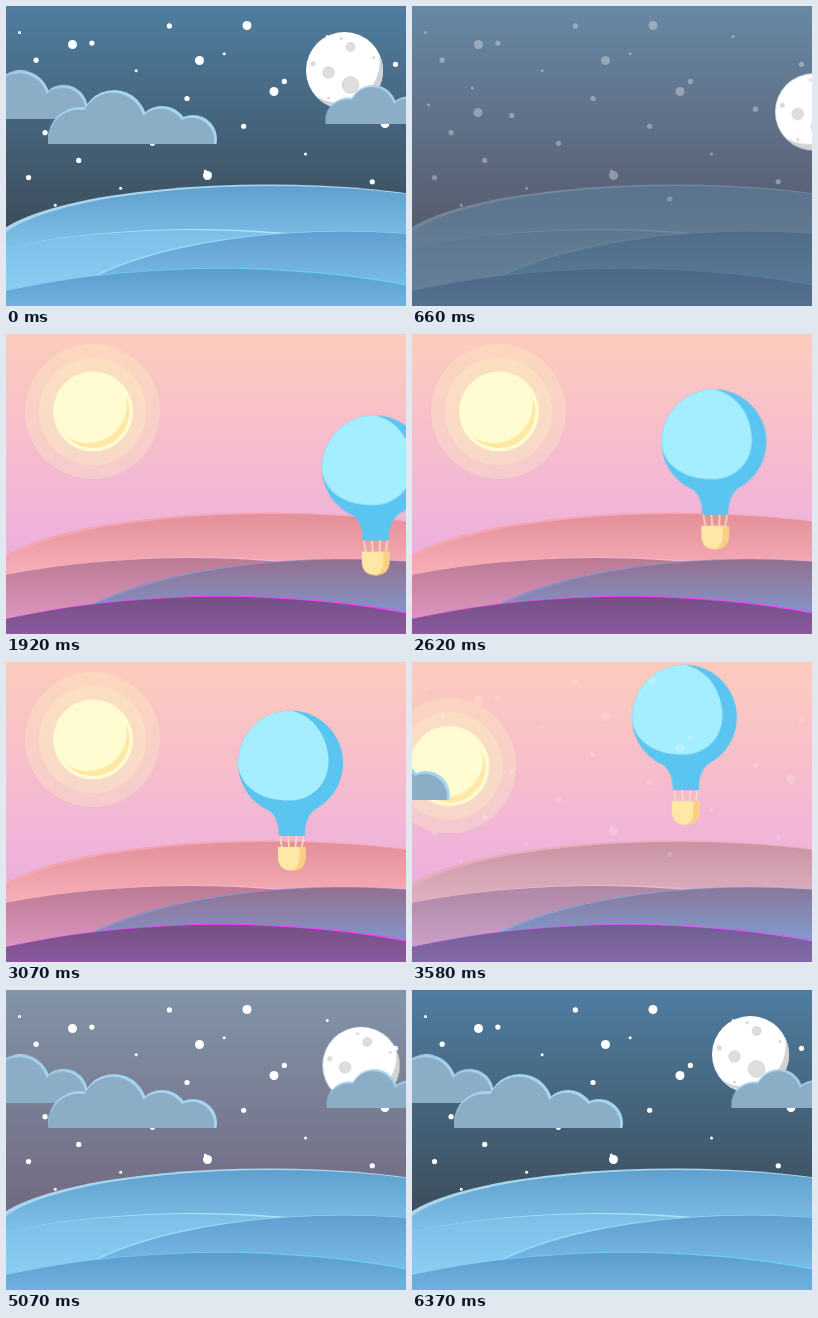
These frames come from a looping animation (400 px wide and 300 px high, 6.78 s). An HTML page:

```html
<!DOCTYPE html>
<html lang="en">
<head>
<meta charset="utf-8">
<title>Night and day</title>
<style>
  html, body { margin: 0; width: 100%; height: 100%; overflow: hidden; background: #4f7da0; }
  svg { display: block; width: 100vw; height: 100vh; }
  .move { animation: 6780ms ease-in-out infinite; }

  #dusk { animation-name: dusk; }
  #snow, #nightHills { animation-name: frost; }
  #sun { animation-name: sun; }
  #moon { animation-name: moon; }
  #balloon { animation-name: balloon; }
  #cloudA { animation-name: cloudA; }
  #cloudB { animation-name: cloudB; }
  #cloudC { animation-name: cloudC; }

  @keyframes dusk {
    0%, 2.655% { opacity: 1; }
    29.2%, 52.2% { opacity: 0; }
    88.5%, 100% { opacity: 1; }
  }
  @keyframes frost {
    0%, 2.655% { opacity: 1; }
    14.45%, 48.525% { opacity: 0; }
    62.54%, 100% { opacity: 1; }
  }
  @keyframes sun {
    0%, 11.8% { transform: translate(-180px, 96px); }
    26.55%, 48.525% { transform: translate(0, 0); }
    60.32%, 100% { transform: translate(-180px, 96px); }
  }
  @keyframes moon {
    0%, 2.655% { transform: translate(0, 0); }
    15.93%, 63.42% { transform: translate(113px, 74px); }
    78.91%, 100% { transform: translate(0, 0); }
  }
  @keyframes balloon {
    0% { transform: translate(180px, 70px); }
    14.75% { transform: translate(180px, 70px); animation-timing-function: cubic-bezier(.4, .42, .72, 1); }
    45.28%, 48.525% { transform: translate(0, 0); }
    63.27%, 100% { transform: translate(-69px, -260px); }
  }
  @keyframes cloudA {
    0%, 2.655% { transform: translate(0, 0); }
    9.44%, 54.13% { transform: translate(-125px, 0); }
    69.6%, 100% { transform: translate(0, 0); }
  }
  @keyframes cloudB {
    0%, 2.655% { transform: translate(0, 0); }
    9.44%, 47.94% { transform: translate(-215px, 0); }
    63.9%, 100% { transform: translate(0, 0); }
  }
  @keyframes cloudC {
    0%, 2.655% { transform: translate(0, 0); }
    9.44%, 60.47% { transform: translate(100px, 0); }
    75.96%, 100% { transform: translate(0, 0); }
  }
</style>
</head>
<body>
<svg viewBox="0 0 400 300" preserveAspectRatio="none">
  <defs>
    <linearGradient id="daySky" gradientUnits="userSpaceOnUse" x1="0" y1="0" x2="0" y2="215">
      <stop stop-color="#fdccbc"/><stop offset=".45" stop-color="#f7bfcb"/><stop offset="1" stop-color="#edb0de"/>
    </linearGradient>
    <linearGradient id="nightSky" gradientUnits="userSpaceOnUse" x1="0" y1="0" x2="0" y2="215">
      <stop stop-color="#4f7da0"/><stop offset="1" stop-color="#3d4f5e"/>
    </linearGradient>
    <clipPath id="cloudFloor"><rect x="-10" y="-60" width="200" height="60"/></clipPath>
    <g id="cloud" clip-path="url(#cloudFloor)"></g>
  </defs>

  <rect width="400" height="300" fill="url(#daySky)"/>
  <g id="dayHills"></g>
  <rect id="dusk" class="move" width="400" height="300" fill="url(#nightSky)"/>

  <g id="sun" class="move">
    <g fill="#fbf3c0">
      <circle cx="86.5" cy="77.5" r="67.5" opacity=".3"/>
      <circle cx="86.5" cy="77.5" r="53.7" opacity=".3"/>
    </g>
    <circle cx="87" cy="77.5" r="40" fill="#fffcd2"/>
    <path d="M119.5 61A36.5 36.5 0 0 1 59.9 102A38.5 38.5 0 0 0 119.5 61" fill="#ffe8a6"/>
  </g>

  <g id="balloon" class="move">
    <g transform="translate(284.5 101)">
      <path d="M-10.5 72L-8.5 85M-2.5 72L-1.5 85M6 72L5 85M13.3 72L11.3 85" stroke="#ffe0b0" stroke-width="1.6"/>
      <g fill="#5bc5f2">
        <circle r="52.5"/>
        <path d="M-40 34C-20 47 -11.5 52 -11.5 73H14.5C14.5 52 22 47 40 34Z"/>
      </g>
      <path d="M-52 5C-47 29 -23 38 0 37.5C24 37 39 18 38 -4C37 -28 22 -48 0 -52.5A52.5 52.5 0 0 0 -52 5" fill="#a4eeff"/>
      <path d="M-12.5 84H15V95Q14 107.5 1.2 107.5Q-11.5 107.5 -12.5 95Z" fill="#ffe8a5"/>
      <path d="M9 84H15V95Q14 107.5 1.2 107.5Q8.5 105 9 95Z" fill="#fbd083"/>
    </g>
  </g>

  <g id="snow" class="move" fill="#fff"></g>
  <g id="nightHills" class="move"></g>

  <g id="moon" class="move">
    <g transform="translate(338.5 64.5)">
      <circle r="38.5" fill="#fff"/>
      <path d="M34.3 -17.5A38.5 38.5 0 0 1 -29.7 24.5A41 41 0 0 0 34.3 -17.5" fill="#d2d2d2"/>
      <g id="craters" fill="#dedede" stroke="#c9c9c9" stroke-width=".8"></g>
    </g>
  </g>

  <g id="cloudA" class="move"><use href="#cloud" transform="translate(-45 113) scale(.9)"/></g>
  <g id="cloudB" class="move"><use href="#cloud" transform="translate(42 138)"/></g>
  <g id="cloudC" class="move"><use href="#cloud" transform="translate(319.5 118) scale(.72)"/></g>
</svg>

<script>
  const el = id => document.getElementById(id);
  const circle = (x, y, r) => `<circle cx="${x}" cy="${y}" r="${r}"/>`;
  const repeat = (n, draw) => Array.from({ length: n }, (_, i) => draw(i)).join('');

  // Each hill: ellipse cx, top, rx, ry, then the shift of its body, which leaves a lit rim.
  const hills = [
    [262, 178.5, 280, 66, 5, 1.5],
    [190, 223, 400, 150, -6, 1],
    [335, 225, 300, 103, 3, .6],
    [217, 261.8, 500, 232, -3, 1]
  ];

  // Each colour row: top, bottom, rim.
  function drawHills(id, colours) {
    el(id).innerHTML = hills.map(([cx, y, rx, ry, dx, dy], i) => {
      const [top, bottom, rim] = colours[i];
      const ellipse = (x, y, fill) => `<ellipse cx="${x}" cy="${y + ry}" rx="${rx}" ry="${ry}" fill="${fill}"/>`;
      return `<linearGradient id="${id}${i}" gradientUnits="userSpaceOnUse" x1="0" y1="${y}" x2="0" y2="${y + 57}">
        <stop stop-color="${top}"/><stop offset="1" stop-color="${bottom}"/></linearGradient>`
        + ellipse(cx, y, rim) + ellipse(cx + dx, y + dy, `url(#${id}${i})`);
    }).join('');
  }
  drawHills('dayHills', [
    ['#e28f98', '#f6acb6', '#f4a5af'],
    ['#b97a91', '#d993bb', '#f7b0d0'],
    ['#936f8f', '#8296cc', '#8496cd'],
    ['#735082', '#985cad', '#ee44fa']
  ]);
  drawHills('nightHills', [
    ['#5f9fce', '#7dbee6', '#a9d6ee'],
    ['#7bbfe7', '#8accf2', '#b4e4fb'],
    ['#609fcf', '#7cbce8', '#96dafb'],
    ['#5c9ccc', '#78bce8', '#66cdf8']
  ]);

  // A few big flakes are placed; the small ones follow a golden-ratio spread, denser to the left.
  const bigFlakes = [[66.5, 38.5], [193.5, 54.5], [241, 19.5], [268, 85.5], [201.5, 169.5], [379, 117.5], [66, 106.5]];
  el('snow').innerHTML = bigFlakes.map(([x, y]) => circle(x, y, 4.5)).join('')
    + repeat(25, i => circle(13.5 + 376 * (i / 24) ** 1.5, 15 + 190 * ((.06 + i * .382) % 1), i % 5 < 2 ? 1.5 : 2.6));

  // Three large craters and a ring of small ones.
  el('craters').innerHTML = circle(-16, 2, 5.6) + circle(6, 14.5, 8.2) + circle(6, -23.5, 4.3)
    + repeat(5, i => {
      const a = (i * 72 - 24) * Math.PI / 180;
      return circle(32 * Math.cos(a), 32 * Math.sin(a), 1 + i % 2);
    });

  // One cloud, standing on y = 0.
  const bumps = [[32, -5, 32], [66, -21, 33], [114, -11, 27], [145, -5, 24]];
  el('cloud').innerHTML = '<g fill="#a5d4f0">' + bumps.map(b => circle(...b)).join('') + '</g><g fill="#8badc6">'
    + bumps.map(([x, y, r]) => circle(x - 1.4, y + 1.4, r - 1.4)).join('') + '</g>';

  // The far left cloud ends one bump earlier.
  const short = el('cloud').cloneNode(true);
  short.id = 'shortCloud';
  for (const layer of short.children) layer.lastChild.remove();
  el('cloud').after(short);
  el('cloudA').firstChild.setAttribute('href', '#shortCloud');
</script>
</body>
</html>
```
